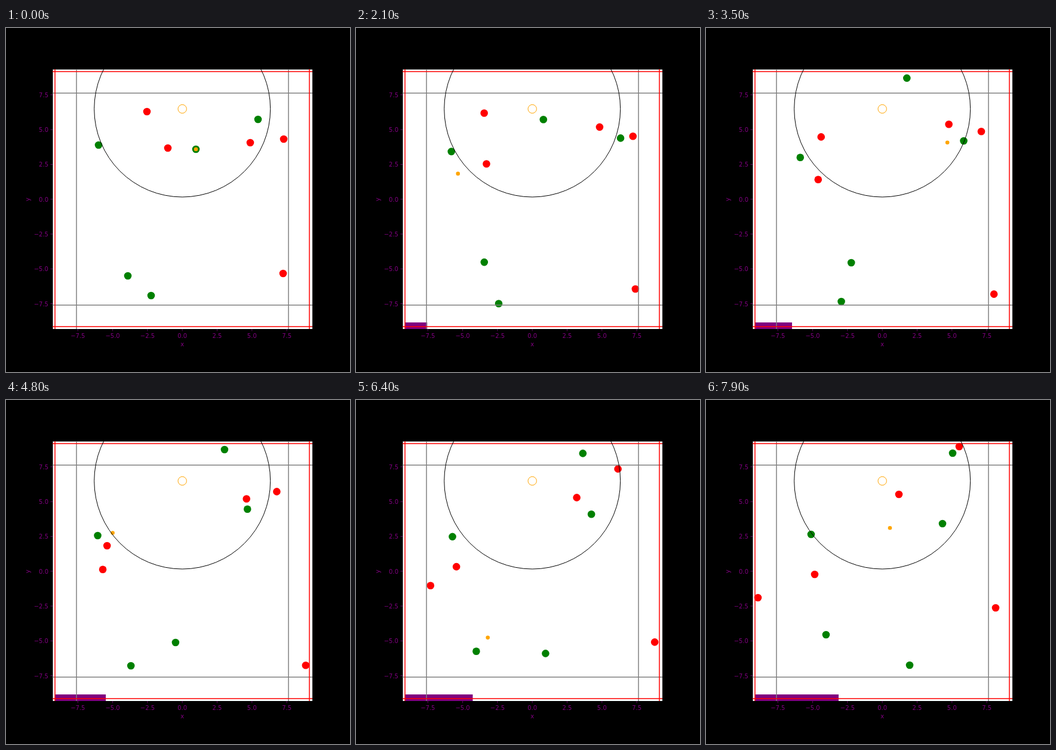
Write an HTML page that moves like this. It is 576 by 576 pixels and loops after 8000 ms.

```html
<!DOCTYPE html>
<html lang="en">
<head>
<meta charset="utf-8">
<title>Passing play</title>
<style>
  html, body { margin: 0; width: 100%; height: 100%; overflow: hidden; background: #000; }
  svg { display: block; width: 576px; height: 576px; }
  text { font: 10px "DejaVu Sans", sans-serif; fill: #800080; }
  .ticks { stroke: #800080; stroke-width: .8; }
  .lines { fill: none; stroke-width: 1.5; }
</style>
</head>
<body>
<svg viewBox="0 0 576 576">
  <defs><clipPath id="area"><rect x="78" y="69" width="435" height="435"/></clipPath></defs>
  <rect width="576" height="576"/>
  <rect x="79" y="70" width="434" height="434" fill="#fff"/>
  <path d="M78.5 504V69.5H513" fill="none" stroke="#808080"/>
  <g id="axes"></g>
  <g clip-path="url(#area)">
    <rect id="bar" x="82" y="493" width="0" height="11" fill="#800080"/>
    <g id="players"></g>
    <circle id="ball" r="3.3" fill="#ffa500"/>
    <g class="lines">
      <path d="M118 69V504M473 69V504M78 109H513M78 464H513" stroke="#808080"/>
      <path d="M82 69V504M508 69V504M78 73H513M78 500H513" stroke="#f00"/>
      <g transform="translate(295.2 135.5)" stroke-width="1">
        <circle r="147.5" stroke="#000"/>
        <circle r="7.2" stroke="#ffa500"/>
      </g>
    </g>
  </g>
</svg>
<script>
const STEP = 100, STEPS = 80, LAST = STEPS - 1;

// Each route is a few points, evenly spaced in time over the loop.
const green = [
  "422,153 443,189 398,183 396,207",
  "155,196 160,210 154,229 176,225",
  "318,203 313,192 318,124 347,72 374,91 382,89 413,89",
  "204,415 222,390 296,411 341,444",
  "243,448 236,462 205,439 201,393"
];
const red = [
  "236,140 208,151 165,260 182,292",
  "271,201 206,236 152,293 87,331",
  "409,192 407,162 397,166 323,158",
  "465,186 459,168 424,78",
  "464,411 471,441 505,438 485,348"
];

// The ball goes through these green players in turn.
const holders = [2, 3, 1, 0, 1, 4, 0, 1];
const FLIGHT = 10;
const passStart = i => Math.min(13 * i, 12 * i + 3);

const byId = id => document.getElementById(id);
function add(parent, tag, attrs, text = "") {
  const el = document.createElementNS("http://www.w3.org/2000/svg", tag);
  for (const k in attrs) el.setAttribute(k, attrs[k]);
  el.textContent = text;
  return parent.appendChild(el);
}

const axes = byId("axes");
for (let k = -3; k <= 3; k++) {
  const label = (k < 0 ? "\u2212" : "") + Math.abs(k * 2.5).toFixed(1);
  const x = 295.2 + k * 58.3, y = 286.7 - k * 58.3;
  add(axes, "path", { class: "ticks", d: `M${x} 504v3.5M78 ${y}h-3.5` });
  add(axes, "text", { x, y: 519, "text-anchor": "middle" }, label);
  add(axes, "text", { x: 71, y: Math.round(y + 4), "text-anchor": "end" }, label);
}
add(axes, "text", { x: 295.2, y: 533, "text-anchor": "middle" }, "x");
add(axes, "text", { transform: "translate(40 287) rotate(-90)", "text-anchor": "middle" }, "y");

const mix = (a, b, u) => a.map((c, i) => c + (b[i] - c) * u);

// Catmull-Rom spline through a route, run on straight at both ends.
function place(route, n) {
  const legs = route.length - 1;
  const s = n / LAST * legs, i = Math.min(Math.floor(s), legs - 1), u = s - i;
  const b = route[i], c = route[i + 1];
  const a = route[i - 1] || mix(c, b, 2), d = route[i + 2] || mix(b, c, 2);
  return b.map((p, k) => p + u / 2 * (c[k] - a[k]
    + u * (2 * a[k] - 5 * p + 4 * c[k] - d[k] + u * (3 * (p - c[k]) + d[k] - a[k]))));
}

function move(el, [x, y]) {
  el.setAttribute("cx", x.toFixed(2));
  el.setAttribute("cy", y.toFixed(2));
}

const team = (routes, fill) => routes.map(text => ({
  route: text.split(" ").map(p => p.split(",").map(Number)),
  el: add(byId("players"), "circle", { r: 6.3, fill })
}));
const players = [...team(green, "#008000"), ...team(red, "#f00")];

function draw(n) {
  const spots = players.map(p => place(p.route, n));
  players.forEach((p, i) => move(p.el, spots[i]));

  let pass = 0;
  while (passStart(pass + 1) <= n) pass++;
  const u = Math.min(1, (n - passStart(pass)) / FLIGHT);
  move(byId("ball"), mix(spots[holders[pass]], spots[holders[pass + 1]], u));

  byId("bar").setAttribute("width", 1.773 * n);
}

const begin = performance.now();
function tick() {
  draw(Math.floor((performance.now() - begin) / STEP) % STEPS);
  requestAnimationFrame(tick);
}
tick();
</script>
</body>
</html>
```
